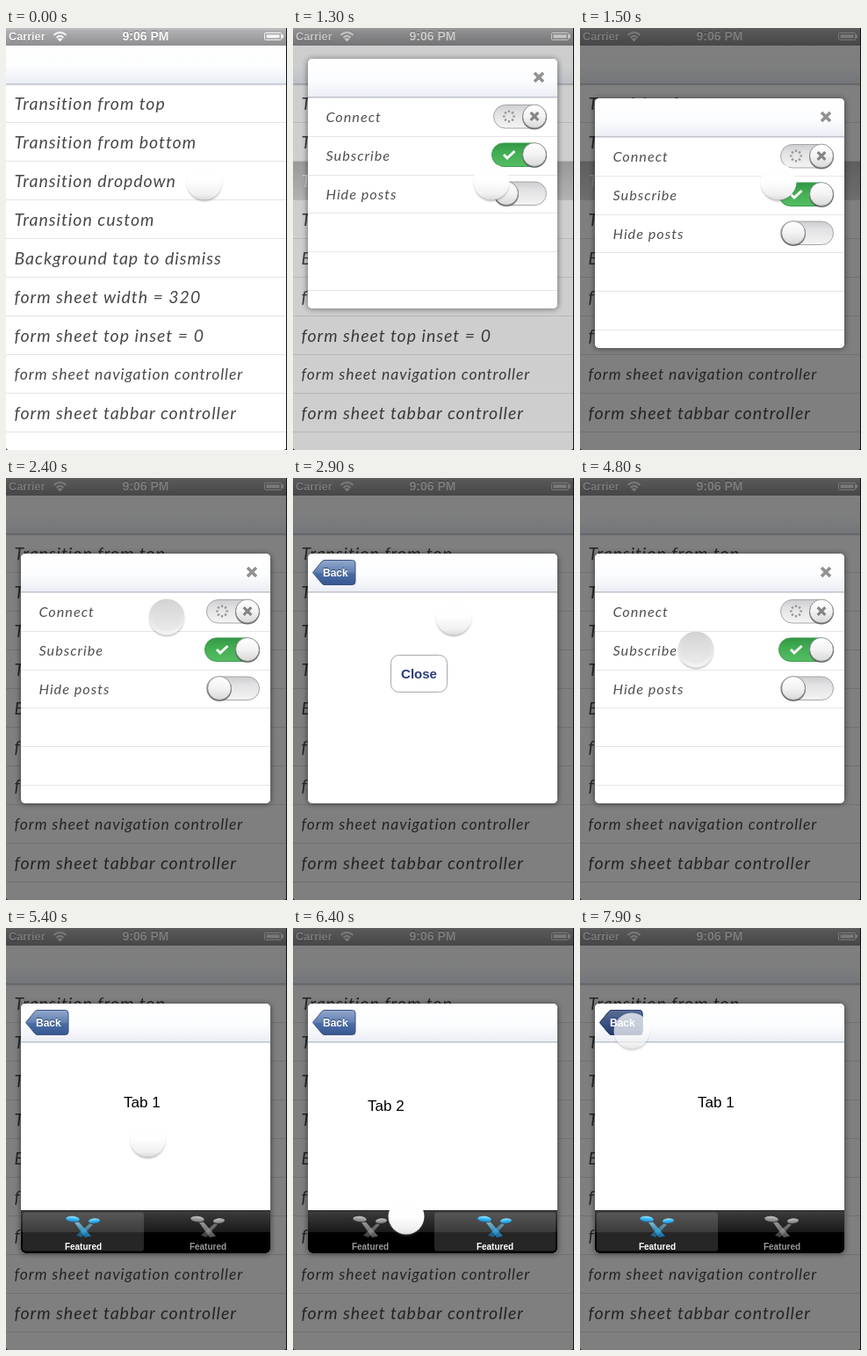
Write an HTML page that moves like this. It is 320 by 480 pixels and loops after 8000 ms.

```html
<!DOCTYPE html>
<html lang="en">
<head>
<meta charset="utf-8">
<title>Form sheet demo</title>
<style>
html, body { margin: 0; width: 100%; height: 100%; overflow: hidden; background: #fff; }
svg { display: block; width: 320px; height: 480px; }
text { font-family: "Liberation Sans", Arial, sans-serif; white-space: pre; }
.b { font-weight: bold; }
.list { font: italic 19.5px Lato, "Open Sans", sans-serif; letter-spacing: .98px; fill: #484848; }
.small { font-size: 17.5px; letter-spacing: .92px; }
.sheet { font: italic 16.2px Lato, "Open Sans", sans-serif; letter-spacing: 1px; fill: #505050; }
.lit { fill: #fff; }
</style>
</head>
<body>
<svg id="stage" viewBox="0 0 320 480" xmlns="http://www.w3.org/2000/svg"></svg>
<script>
const LOOP = 8000, SIDE = 284;
const stage = document.getElementById('stage');

const grad = (id, ...stops) => `<linearGradient id="${id}" x2="0" y2="1">` +
  stops.map(([at, color]) => `<stop offset="${at}" stop-color="${color}"/>`).join('') + '</linearGradient>';
const rect = (x, y, w, h, fill, more = '') =>
  `<rect x="${x}" y="${y}" width="${w}" height="${h}" fill="${fill}" ${more}/>`;
const text = (x, y, str, cls, more = '') => `<text x="${x}" y="${y}" class="${cls}" ${more}>${str}</text>`;
const cross = (x, y, r, color, w) =>
  `<path d="M${x - r} ${y - r}l${2 * r} ${2 * r}m0 ${-2 * r}l${-2 * r} ${2 * r}" stroke="${color}" stroke-width="${w}" fill="none"/>`;

const defs = `<defs>
${grad('status', [0, '#c2c2c4'], [.15, '#b0b0b2'], [1, '#8f8f92'])}
${grad('bar', [0, '#fff'], [.55, '#fcfdfe'], [1, '#ebeef5'])}
${grad('picked', [0, '#bdbdbd'], [1, '#dcdcdc'])}
${grad('track', [0, '#cdcdcf'], [.35, '#e2e2e4'], [1, '#f4f4f4'])}
${grad('green', [0, '#339745'], [.4, '#41ad52'], [1, '#55bd63'])}
${grad('knob', [0, '#fff'], [.5, '#f3f3f3'], [1, '#d8d8d8'])}
${grad('back', [0, '#93a8cb'], [.5, '#5f7fb2'], [.52, '#4c6fa7'], [1, '#36568f'])}
${grad('backDown', [0, '#5b6d92'], [.5, '#3b5385'], [1, '#213a6c'])}
${grad('gloss', [0, '#3c3c3c'], [1, '#191919'])}
${grad('blue', [0, '#9fe6ff'], [.5, '#38b8f4'], [1, '#1787d4'])}
${grad('gray', [0, '#c4c4c4'], [1, '#777'])}
${grad('idle', [0, '#fff'], [.5, '#fefefe'], [.85, '#f0f0f0'], [1, '#dadada'])}
${grad('ring', [0, '#d2d2d2'], [1, '#f4f4f4'])}
${grad('pad', [0, '#d6d6d6'], [1, '#ebebeb'])}
<clipPath id="clip">${rect(17, 86, SIDE, SIDE, '#fff', 'rx="5"')}</clipPath>
<filter id="soft" x="-20%" y="-20%" width="140%" height="140%"><feGaussianBlur stdDeviation="3"/></filter>
<filter id="mist" x="-30%" y="-30%" width="160%" height="160%"><feGaussianBlur stdDeviation="1.2"/></filter>
</defs>`;

const statusBar = () => {
  const arcs = [[0, 9, 15], [3, 6, 9.5]].map(([inset, r]) =>
    `<path d="M${54.5 + inset} ${8 + inset}q${7 - inset} ${-r * .66} ${14 - 2 * inset} 0" stroke-width="2" fill="none"/>`).join('');
  return rect(0, 0, 320, 20, 'url(#status)') +
    text(3, 15, 'Carrier', 'b', 'font-size="12.7" fill="#777"') +
    text(3, 14, 'Carrier', 'b', 'font-size="12.7" fill="#f4f4f4"') +
    `<g stroke="#f4f4f4">${arcs}</g><path d="M58.5 12.5q3-2 6 0l-3 3z" fill="#f4f4f4"/>` +
    text(132.5, 13, '9:06 PM', 'b', 'font-size="14" fill="#777"') +
    text(132.5, 14, '9:06 PM', 'b', 'font-size="14" fill="#fafafa"') +
    rect(294.5, 5.5, 19, 8, 'none', 'stroke="#f4f4f4" rx="1"') +
    rect(296.5, 7.5, 15, 4, '#f4f4f4') + rect(314, 7.5, 2, 4, '#f4f4f4');
};

const rows = ['Transition from top', 'Transition from bottom', 'Transition dropdown', 'Transition custom',
  'Background tap to dismiss', 'form sheet width = 320', 'form sheet top inset = 0',
  'form sheet navigation controller', 'form sheet tabbar controller'];
const rowText = (i, cls = '') =>
  text(9.5, 92.5 + 44 * i - (i === 7 ? .5 : 0), rows[i], `list ${i === 7 ? 'small' : ''} ${cls}`);
const list = () => rect(0, 0, 320, 480, '#fff') +
  rows.map((s, i) => rowText(i) + rect(0, 107 + 44 * i, 320, 1, '#e4e4e4')).join('') +
  `<g id="picked">${rect(0, 152, 320, 43, 'url(#picked)')}${rowText(2, 'lit')}</g>` +
  rect(0, 20, 320, 43, 'url(#bar)') + rect(0, 63, 320, 1, '#bfc5d1') +
  rect(0, 64, 320, 1, '#d9dbe0') + rect(0, 65, 320, 1, '#f2f2f4');

const knob = (x, y) => `<circle cx="${x}" cy="${y + 1}" r="14" fill="#444" opacity=".75"/>
  <circle cx="${x}" cy="${y}" r="13.4" fill="url(#knob)" stroke="#868686" stroke-width=".8"/>`;
const track = (x, y, fill, edge) =>
  rect(x + .5, y - 13, 289 - x - 1, 26.5, `url(#${fill})`, `rx="13.2" stroke="${edge}"`);
const spinner = (x, y) => Array.from({ length: 8 }, (_, i) =>
  `<path d="M${x} ${y - 4.4}v-2.6" transform="rotate(${45 * i} ${x} ${y})" stroke="#979797" stroke-width="2.2"/>`).join('');

const home = () => rect(17, 130, SIDE, 240, '#fff') +
  [174, 218, 261, 305, 349].map(y => rect(17, y, SIDE, 1, '#e6e6e6')).join('') +
  ['Connect', 'Subscribe', 'Hide posts'].map((s, i) => text(37.5, 157.5 + 44 * i, s, 'sheet')).join('') +
  track(228, 151.5, 'track', '#a5a5a7') + spinner(246, 151.5) + knob(275, 151.5) + cross(275, 151.5, 4.3, '#858585', 3.2) +
  track(226, 195, 'green', '#3b9a4a') +
  '<path d="M240 195l4 4 8.500-8" fill="none" stroke="#fff" stroke-width="3"/>' + knob(275, 195) +
  track(228, 239, 'track', '#a5a5a7') + knob(243, 239);

const closePage = () => rect(17, 130, SIDE, 240, '#fff') +
  rect(111.5, 201.5, 64, 42, '#fff', 'rx="9" stroke="#a9a9ad"') +
  text(143.5, 228, 'Close', 'b', 'font-size="15" fill="#2b3d80" text-anchor="middle"');

const lamps = (x, fill) => `<g fill="url(#${fill})">
  <path d="M${x - 10} 335l5-.5 14 16-7 1.500z" opacity=".7"/><path d="M${x + 11} 337l-4-.5-15 13 6 2.500z" opacity=".5"/>
  <ellipse cx="${x - 12}" cy="331" rx="7.8" ry="3.2" transform="rotate(5 ${x - 12} 331)"/>
  <ellipse cx="${x + 12.5}" cy="333.2" rx="6.5" ry="2.8" transform="rotate(-5 ${x + 12} 333)"/></g>`;
const tabItem = (x, on) => (on ? rect(x - 69, 323.5, 138, 44, '#fff', 'rx="3" opacity=".15"') : '') +
  lamps(x, on ? 'blue' : 'gray') +
  text(x, 366, 'Featured', 'b', `font-size="10" fill="${on ? '#fff' : '#999'}" text-anchor="middle"`);
const tabSet = n => `<g id="tab${n}">` +
  (n === 1 ? text(134, 204, 'Tab 1', '', 'font-size="17"') : text(85, 208, 'Tab 2', '', 'font-size="17"')) +
  tabItem(88, n === 1) + tabItem(230, n === 2) + '</g>';
const tabPage = () => rect(17, 130, SIDE, 240, '#fff') + rect(17, 321, SIDE, 49, '#000') +
  rect(17, 322, SIDE, 24, 'url(#gloss)') + rect(17, 321, SIDE, 1, '#222') + tabSet(1) + tabSet(2);

const arrow = 'M22.5 107.5L33 94.8q1.2-1.3 3-1.3h31.5q3.5 0 3.5 3.5v21q0 3.5-3.5 3.5H36q-1.8 0-3-1.3z';
const backButton = () => `<g id="back"><path d="${arrow}" fill="url(#back)" stroke="#3d5480"/>
  <path id="down" d="${arrow}" fill="url(#backDown)" stroke="#2a3f6b"/>` +
  text(34, 111, 'Back', 'b', 'font-size="12" fill="#2c4270"') +
  text(34, 112, 'Back', 'b', 'font-size="12" fill="#fff"') + '</g>';

const sheet = () => `<g id="sheet">${rect(16, 86, SIDE + 2, SIDE + 1, '#000', 'rx="6" opacity=".42" filter="url(#soft)"')}
  <g clip-path="url(#clip)">${rect(17, 86, SIDE, SIDE, '#fff')}
  <g id="home">${home()}</g><g id="close">${closePage()}</g><g id="tabs">${tabPage()}</g>
  ${rect(17, 86, SIDE, 43, 'url(#bar)')}${rect(17, 129, SIDE, 1, '#bfc3cd')}${rect(17, 130, SIDE, 1, '#dcdee2')}
  <g id="quit">${cross(280, 107, 5, '#919191', 3.6)}</g>${backButton()}</g></g>`;

const cursor = () => `<g id="cursor"><circle cy="2.5" r="19.5" fill="#666" opacity=".5" filter="url(#mist)"/>
  <circle r="20.5" fill="url(#idle)"/>
  <g id="press"><circle r="20.5" fill="url(#ring)"/><circle r="16.5" fill="url(#pad)"/></g></g>`;

const frame = rect(319, 0, 1, 480, '#111') + '<path d="M0 477v3h3q-3 0-3-3zM320 477v3h-4q3 0 4-3z" fill="#111"/>';

stage.innerHTML = defs + list() + statusBar() +
  rect(0, 0, 320, 480, '#000', 'id="shade"') + frame + sheet() + cursor();

const el = {};
stage.querySelectorAll('[id]').forEach(n => el[n.id] = n);

const clamp = v => Math.max(0, Math.min(1, v));
const ramp = (t, a, b) => clamp((t - a) / (b - a));
const ease = p => p * p * (3 - 2 * p);
const out = p => 1 - (1 - p) * (1 - p);
const slide = (t, at) => ease(ramp(t, at, at + 350));

// time, x, y
const path = [[0, 226, 175], [1850, 226, 175], [2250, 183, 158], [2950, 183, 158], [3550, 57, 106], [4000, 57, 106],
  [4600, 132, 195], [5200, 132, 195], [5750, 230, 345], [6000, 230, 345], [6350, 129, 328], [6850, 129, 328],
  [7400, 59, 117], [8000, 59, 117]];
const taps = [[980, 1160], [2320, 2520], [4720, 4920], [5830, 5950], [6530, 6660]];
// time, sheet offset, easing
const drop = [[1176.5, -480, out], [1376.5, 20, ease], [1476, -10, out], [1576, 0, out]];

function along(keys, t, curve) {
  let i = 0;
  while (i < keys.length - 2 && t >= keys[i + 1][0]) i++;
  const a = keys[i], b = keys[i + 1], p = (curve || a[2])(ramp(t, a[0], b[0]));
  return k => a[k] + (b[k] - a[k]) * p;
}
const move = (node, x, y) => node.setAttribute('transform', `translate(${Math.round(x * 2) / 2} ${Math.round(y)})`);
const fade = (node, v) => node.setAttribute('opacity', v.toFixed(3));

function draw(t) {
  fade(el.picked, t < 1150 ? 0 : 1 - ramp(t, 1600, 1900));
  fade(el.shade, .5 * ramp(t, 1190, 1480));
  move(el.sheet, 0, along(drop, t)(1));

  const first = slide(t, 2500) - slide(t, 3880), second = slide(t, 4880), deep = first + second;
  move(el.home, -SIDE * deep, 0);
  move(el.close, SIDE * (1 - first), 0);
  move(el.tabs, SIDE * (1 - second), 0);
  fade(el.quit, 1 - deep);
  fade(el.back, deep);
  move(el.back, 60 * (1 - deep), 0);
  fade(el.down, (t >= 3600 && t < 3880) || t >= 7600 ? 1 : 0);

  const two = t >= 5900 && t < 6600;
  fade(el.tab1, two ? 0 : 1);
  fade(el.tab2, two ? 1 : 0);

  const at = along(path, t, ease);
  move(el.cursor, at(1), at(2));
  const held = Math.max(...taps.map(([a, b]) => ramp(t, a, a + 60) * (1 - ramp(t, b, b + 80))));
  fade(el.press, held);
  // the pointer turns glassy while it rests on the back button
  const glass = Math.max(ramp(t, 3500, 3650) * (1 - ramp(t, 4000, 4150)), ramp(t, 7400, 7650));
  fade(el.cursor, 1 - .28 * glass);
}

function tick() {
  draw(performance.now() % LOOP);
  requestAnimationFrame(tick);
}
draw(0);
requestAnimationFrame(tick);
</script>
</body>
</html>
```
